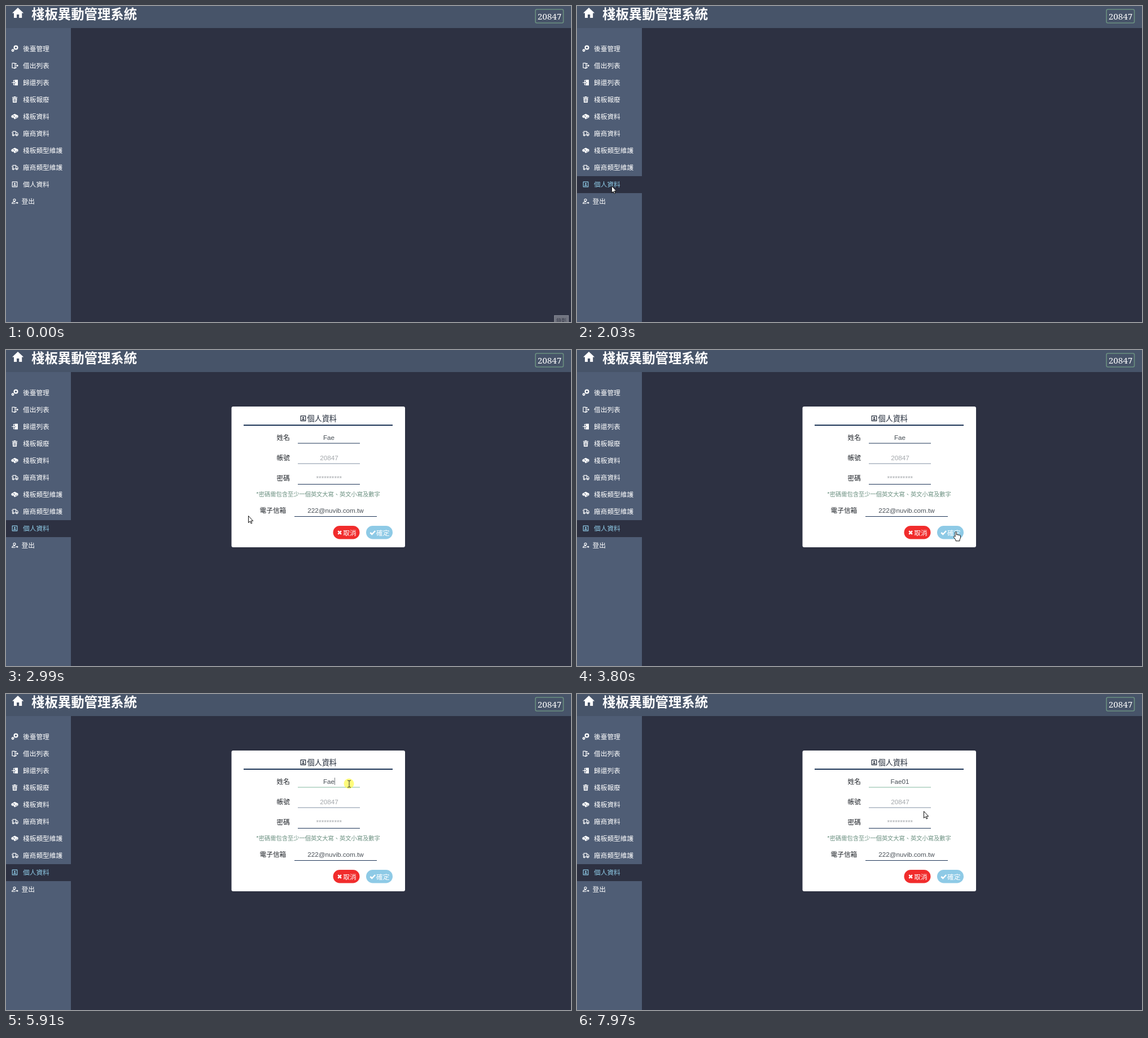
An HTML page that plays this animation: 1001 by 559 pixels, repeating every 8000 ms.

```html
<!DOCTYPE html>
<html lang="zh-Hant">
<head>
<meta charset="utf-8">
<title>棧板異動管理系統</title>
<style>
  html, body { margin: 0; width: 100%; height: 100%; overflow: hidden; background: #2d3142; }
  svg { display: block; width: 1001px; height: 559px; }
  text { font: 11.7px "Noto Sans CJK TC", "Noto Sans CJK JP", "Noto Sans CJK", sans-serif; white-space: pre; }
  .brand { font-size: 23.4px; font-weight: 700; fill: #fff; }
  .badge { font: 15.2px "Noto Serif", serif; fill: #fff; }
  .item { color: #fff; }
  .item.on { color: #8ecae6; }
  .item rect.row { fill: none; }
  .item.on rect.row { fill: #2d3142; }
  .item text, .fill { fill: currentColor; }
  .line { fill: none; stroke: currentColor; stroke-width: 1.2; stroke-linejoin: round; }
  .head { font-size: 13.1px; font-weight: 500; fill: #1c2534; }
  .label { fill: #1c2026; }
  .input { font-family: "Liberation Sans", Arial, sans-serif; font-kerning: none; fill: #495057; }
  .pale { fill: #a3a7ab; }
  .hint { font-size: 10.24px; fill: #6b9080; }
  .white { fill: #fff; }
  .mid { text-anchor: middle; }
  .rule { fill: #1d3557; }
  #cursor path { stroke-linejoin: round; }
</style>
</head>
<body>
<svg viewBox="0 0 1001 559">
  <rect width="1001" height="559" fill="#2d3142"/>
  <rect y="39" width="115" height="520" fill="#4f5d75"/>
  <rect width="1001" height="39" fill="#475469"/>
  <path class="white" d="M21 3L11 12.4h3V21h5v-6h4.200v6h5v-8.600h3z"/>
  <text class="brand" x="45" y="22.500">棧板異動管理系統</text>
  <rect x="938" y="6" width="49.500" height="24" rx="2.500" fill="none" stroke="#6b9080" stroke-width="1.600"/>
  <text class="badge mid" x="963" y="24">20847</text>

  <g id="menu"></g>

  <g id="card">
    <rect x="399.500" y="100" width="307.500" height="249" rx="3" fill="#fff"/>
    <g id="form">
      <g transform="translate(526.500 121)" color="#1c2534" id="headIcon"></g>
      <text class="head" x="533.500" y="125.800">個人資料</text>
      <rect class="rule" x="421" y="132" width="264" height="2"/>
      <text class="label" x="479.500" y="159">姓名</text>
      <text class="label" x="479.500" y="195">帳號</text>
      <text class="label" x="479.500" y="231">密碼</text>
      <text class="label" x="449.500" y="288.300">電子信箱</text>
      <text class="input mid" id="name" x="572" y="159"></text>
      <text class="input pale mid" x="572.500" y="194.500">20847</text>
      <text class="input pale mid" x="572.300" y="231">**********</text>
      <text class="input mid" x="584" y="288.300">222@nuvib.com.tw</text>
      <rect class="rule" id="nameRule" x="517" y="164.500" width="110" height="1"/>
      <rect x="517" y="200.500" width="110" height="1" fill="#8290a3"/>
      <rect class="rule" x="517" y="237" width="110" height="1"/>
      <rect class="rule" x="511" y="294" width="146" height="1"/>
      <rect id="caret" y="148" width="1" height="13" fill="#777c82"/>
      <text class="hint" x="443" y="258.900">*密碼需包含至少一個英文大寫、英文小寫及數字</text>
      <rect x="579.500" y="311" width="47" height="23.500" rx="11.700" fill="#f12c2c"/>
      <path d="M588.300 320.200l5.600 5.600m0-5.600l-5.600 5.600" stroke="#fff" stroke-width="2.500"/>
      <text class="white" x="597.300" y="327.500">取消</text>
      <rect x="638" y="311" width="47" height="23.500" rx="11.700" fill="#8ecae6"/>
      <path d="M645.300 323l3 3 5.800-6" fill="none" stroke="#fff" stroke-width="2.500"/>
      <text class="white" x="656" y="327.500">確定</text>
    </g>
  </g>

  <g id="record">
    <rect x="971.500" y="547.500" width="25" height="14" fill="#70737f" stroke="#858894"/>
    <text class="mid" x="984" y="560.300" style="font-size:9px" fill="#343847">錄影</text>
  </g>

  <g id="cursor">
    <circle id="click" cx="-.5" cy="-.5" r="9" fill="#fffa3c" fill-opacity=".68"/>
    <path id="arrow" d="M.5.500V12.500L3.200 10l2 4 1.700-.8L5 9.300h3.700z" fill="#fff" stroke="#111"/>
    <path id="hand" d="M-1 1.800a1.300 1.300 0 0 1 2.600 0V6.200a1.250 1.250 0 0 1 2.400.4a1.250 1.250 0 0 1 2.300.5a1.200 1.200 0 0 1 2.200.9V11.500L7 14.500V16.800H0V15L-3.500 10.200a1.300 1.300 0 0 1 1.900-1.700L-1 9.300z" fill="#fff" stroke="#111"/>
    <path id="beam" d="M-3-6h2l1 1 1-1h2M0-5V5M-3 6h2l1-1 1 1h2" fill="none" stroke="#333"/>
  </g>
</svg>
<script>
const $ = id => document.getElementById(id);
const line = d => `<path class="line" d="${d}"/>`;
const fill = d => `<path class="fill" fill-rule="evenodd" d="${d}"/>`;

// Icons are drawn around their own centre.
const icons = {
  gears: '<circle class="line" cx="2" cy="-2" r="2.900" stroke-width="2" style="stroke-width:2.300"/>' +
    '<circle class="line" cx="-3.400" cy="3" r="1.600" style="stroke-width:1.700"/>',
  out: line('M0-4.500H-4.500V4H0M-3-4.500L.5-3.500V5L-3 4M.5-4H2.500V-2M2.500 2V4H.5M1.500 0H5.500M4-1.700L5.700 0 4 1.700'),
  back: fill('M0-5H5.500V5H0z M1.300-.6v1.600h1v-1.600z') + line('M0-4H-2V-2M-2 2V4H0M-5.500 0H-1M-2.500-1.700L-.8 0-2.500 1.700'),
  trash: fill('M-4.600-4.500H-2L-1.400-5.600H1.400L2-4.500H4.600V-3.200H-4.600zM-4-2.500H4L3.400 5.500H-3.400zM-2-1.300V4.200h.8V-1.300zM-.4-1.300V4.200h.8V-1.300zM1.200-1.300V4.200H2V-1.300z'),
  pallet: fill('M-6-1.500L0-4.800 6-1.700V1.500L0 4.700-1.600 3.700V2.200L-3 1.500V3L-6 1.300zM-3.300-1.400L-.2.3 1-.4-2.200-2.100zM.6 2.300V3.100L4.600 1V.2z'),
  truck: line('M-4-3.700H2V2.500H-1.500M-5.500-1.800H-2.500M-4.800 0H-2M2-2H4L5.600 0V2.700H5M-4 1V2.500') +
    '<circle class="line" cx="-2.800" cy="3" r="1.200"/><circle class="line" cx="3.500" cy="3" r="1.200"/>',
  card: line('M-4.300-4.300H4.300V4.300H-4.300z') + fill('M0-2.500a1.400 1.400 0 0 1 0 2.800a1.400 1.400 0 0 1 0-2.800M-2.700 2.700Q-2 .7 0 .7T2.700 2.700z'),
  exit: '<circle class="line" cx="-.5" cy="-2.200" r="2"/>' + line('M1 4H-4.800Q-4.800 1.200-1.500 1.200H.5M1.500 2.700H5.300M4 1.400L5.500 2.700 4 4')
};

const items = [
  ['gears', '後臺管理'], ['out', '借出列表'], ['back', '歸還列表'], ['trash', '棧板報廢'],
  ['pallet', '棧板資料'], ['truck', '廠商資料'], ['pallet', '棧板類型維護'], ['truck', '廠商類型維護'],
  ['card', '個人資料'], ['exit', '登出']
];
$('menu').innerHTML = items.map(([icon, label], i) =>
  `<g class="item" transform="translate(0 ${76 + 30 * i})"><rect class="row" y="-15" width="115" height="30"/>` +
  `<g transform="translate(15.500 -.5)">${icons[icon]}</g>` +
  `<text x="${icon === 'exit' ? 27.5 : 30}" y="4.300">${label}</text></g>`).join('');
$('headIcon').innerHTML = icons.card;
const profile = $('menu').children[8];

// Pointer moves: start, end, steps, target x, target y
const moves = [
  [530, 1150, 10, 120, 357],
  [1220, 1290, 2, 94, 328],
  [1360, 1700, 5, 61, 318],
  [2560, 3340, 12, 651, 278],
  [3400, 3800, 6, 671, 321],
  [4070, 4690, 10, 607, 230],
  [5150, 5840, 10, 608, 159],
  [7900, 7970, 2, 614, 207]
];
const inputs = [[517, 145, 627, 166], [517, 217, 627, 238], [511, 272, 657, 295]];
const links = [[0, 61, 115, 361], [579, 311, 627, 335], [638, 311, 685, 335]];

const between = (t, a, b) => t >= a && t < b;
const hits = (boxes, x, y) => boxes.some(([l, t, r, b]) => between(x, l, r) && between(y, t, b));
const show = (id, on) => { $(id).style.display = on ? '' : 'none'; };

function pointer(t) {
  let x = 1000, y = 553;
  for (const [start, end, steps, tx, ty] of moves) {
    if (t < start) break;
    const step = Math.floor((t - start) / (end - start) * (steps - 1) + .05) + 1;
    const p = Math.min(1, step / steps), e = p * p * (3 - 2 * p);
    x += (tx - x) * e;
    y += (ty - y) * e;
  }
  return [Math.round(x), Math.round(y)];
}

function draw(t) {
  const [x, y] = pointer(t);
  const loading = between(t, 2230, 2300), loaded = t >= 2300;

  $('menu').style.opacity = loading ? .03 : 1;
  profile.classList.toggle('on', loaded || !loading && hits([[0, 301, 115, 331]], x, y));
  show('record', t < 70);
  show('card', t >= 2230);
  show('form', loaded);

  const typed = '01'.slice(0, (t >= 7070) + (t >= 7170));
  $('name').textContent = 'Fae' + typed;
  $('nameRule').style.fill = t >= 5910 ? '#84b89f' : '';
  $('caret').setAttribute('x', 582 + 3 * typed.length);
  show('caret', between(t, 5910, 6440) || between(t, 6970, 7700));

  const waiting = between(t, 2030, 2300);
  const kind = waiting ? 'arrow' : hits(links.slice(0, loaded ? 3 : 1), x, y) ? 'hand' :
    loaded && hits(inputs, x, y) ? 'beam' : 'arrow';
  for (const k of ['arrow', 'hand', 'beam']) show(k, k === kind);
  show('click', between(t, 1910, 2030) || between(t, 5910, 6040));
  show('cursor', t >= 530);
  $('cursor').setAttribute('transform', `translate(${x} ${y})`);
}

const begin = performance.now();
function tick() {
  draw((performance.now() - begin) % 8000);
  requestAnimationFrame(tick);
}
tick();
</script>
</body>
</html>
```
